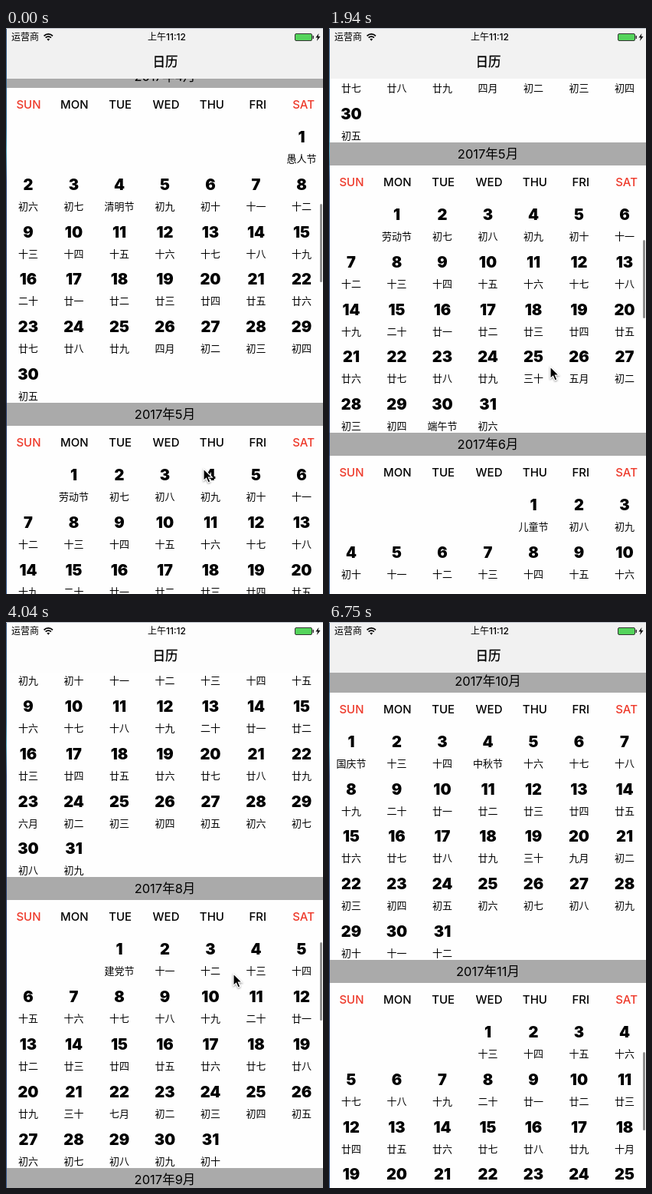
Write an HTML page that moves like this. It is 414 by 737 pixels and loops after 6810 ms.

```html
<!DOCTYPE html>
<html lang="zh-CN">
<head>
<meta charset="utf-8">
<title>日历</title>
<style>
  html, body { margin: 0; width: 100%; height: 100%; overflow: hidden; background: #fefefe; }
  body { position: relative; color: #000; font-family: Inter, "Noto Sans CJK SC", "Noto Sans CJK", sans-serif; }
  body * { position: absolute; }
  #list { left: 0; top: 0; width: 414px; }
  .bar { left: 0; width: 414px; height: 30px; background: #aaa; }
  .label { height: 20px; line-height: 20px; text-align: center; white-space: nowrap; }
  .month { font-size: 16.5px; }
  .week { font-size: 15px; font-weight: 500; }
  .red { color: #ee3a2b; }
  .day { font-size: 20px; font-weight: 900; }
  .lunar { font-size: 13px; font-family: "Noto Sans CJK SC", "Noto Sans CJK", sans-serif; }
  #nav { left: 0; top: 0; width: 414px; height: 66px; }
  .title { font-size: 16.5px; -webkit-text-stroke: .3px #000; }
  .status { font-size: 12px; }
  .clock { font-weight: 500; }
  #thumb { left: 410px; top: 0; width: 2.5px; height: 102px; border-radius: 2px; background: #8e8e8e; }
  #edge { left: 0; top: 0; width: 1px; height: 737px;
    background: linear-gradient(#35557f, #2f6f9c 130px, #4a9cba 160px, #27447a 200px, #1b2f5e 480px, #31558a); }
  #top { left: 0; top: 0; width: 414px; height: 1px; background: #b9bec6; }
  #tip { left: 371px; top: 722px; width: 60px; height: 30px; box-sizing: border-box;
    border: 1px solid #b5b5b5; border-radius: 5px; background: #ececec; }
  svg { left: 0; top: 0; overflow: visible; }
</style>
</head>
<body>
<div id="list"></div>
<div id="thumb"></div>
<div id="nav">
  <svg width="414" height="30">
    <g fill="none" stroke="#000" stroke-width="1.7">
      <path d="M49.6 10.3a8 8 0 0 1 11.4 0M51.7 12.7a5 5 0 0 1 7.2 0"/>
    </g>
    <path d="M53.4 14.6a2.7 2.7 0 0 1 3.8 0l-1.9 2.2z"/>
    <rect x="377.5" y="7.5" width="22" height="9" rx="1.5" fill="#55d45c" stroke="#333"/>
    <rect x="400.5" y="10" width="1.5" height="4" fill="#333"/>
    <path d="M408.5 7l-4 5.6h2.6l-1.2 4.4 4.6-6h-2.8z"/>
  </svg>
</div>
<div id="tip"></div>
<svg id="cursor" width="14" height="20">
  <path d="M0 0v15.5l3.6-3.3 2.5 5.8 2.8-1.2-2.5-5.6h5z" stroke="#fff" stroke-width="1.2"
    style="filter: drop-shadow(0 1px 1px #0006)"/>
</svg>
<div id="edge"></div>
<div id="top"></div>
<script>
const $ = id => document.getElementById(id);
const ROW = 61.8, HEAD = 69.2, LOOP = 6810;

function label(parent, cls, x, y, text, width = 100) {
  const el = document.createElement('div');
  el.className = 'label ' + cls;
  el.style.cssText = `left:${x - width / 2}px;top:${Math.round(y) - 10}px;width:${width}px`;
  el.textContent = text;
  parent.append(el);
}

// Lunar calendar of 2017: each month's first day and name
const lunarMonths = [
  [3, 28, '三'], [4, 26, '四'], [5, 26, '五'], [6, 24, '六'], [7, 23, '六'],
  [8, 22, '七'], [9, 20, '八'], [10, 20, '九'], [11, 18, '十']
];
const holidays = {
  '4-1': '愚人节', '4-4': '清明节', '5-1': '劳动节', '5-30': '端午节', '6-1': '儿童节',
  '7-1': '建军节', '8-1': '建党节', '9-10': '教师节', '10-1': '国庆节', '10-4': '中秋节'
};
const date = (m, d) => Date.UTC(2017, m - 1, d);

function lunar(m, d) {
  const [lm, ld, name] = lunarMonths.filter(s => date(s[0], s[1]) <= date(m, d)).pop();
  const n = Math.round((date(m, d) - date(lm, ld)) / 864e5) + 1;
  if (n === 1) return name + '月';
  if (n === 20) return '二十';
  if (n === 30) return '三十';
  return '初十廿'[Math.floor(n / 10) - (n === 10 ? 1 : 0)] + '十一二三四五六七八九'[n % 10];
}

const tops = [];
function buildMonth(m, top) {
  const list = $('list'), bar = document.createElement('div');
  bar.className = 'bar';
  bar.style.top = Math.round(top) + 'px';
  list.append(bar);
  label(bar, 'month', 207.5, 15, `2017年${m}月`);
  'SUN MON TUE WED THU FRI SAT'.split(' ').forEach((w, i) =>
    label(list, 'week' + (i % 6 ? '' : ' red'), 29.5 + 59.85 * i, top + 52, w));
  const first = new Date(date(m, 1)).getUTCDay();
  const days = new Date(date(m + 1, 0)).getUTCDate();
  for (let d = 1; d <= days; d++) {
    const cell = first + d - 1, x = 29 + 59.5 * (cell % 7);
    const y = top + 94 + ROW * Math.floor(cell / 7);
    label(list, 'day', x, y, d);
    label(list, 'lunar', x, y + 28, holidays[m + '-' + d] || lunar(m, d));
  }
  tops.push(top);
  return top + HEAD + ROW * Math.ceil((first + days) / 7);
}
for (let m = 4, top = 0; m <= 11; m++) top = buildMonth(m, top);

label($('nav'), 'title', 208, 44, '日历');
label($('nav'), 'status', 25, 12, '运营商');
label($('nav'), 'status clock', 210, 12, '上午11:12');
label($('tip'), 'lunar', 27, 13, '地图', 50);

// Piecewise linear value through [position, ...values]
function along(points, p, i = 1) {
  if (p <= points[0][0]) return points[0][i];
  const n = points.findIndex(q => q[0] > p);
  if (n < 0) return points.at(-1)[i];
  const a = points[n - 1], b = points[n];
  return a[i] + (b[i] - a[i]) * (p - a[0]) / (b[0] - a[0]);
}

// Each flick drags from grab to release, then coasts the distance left to its end
const START = -48, TAU = 500;
const flicks = [
  { grab: 100, release: 550, end: 307.5, dist: 274 },
  { grab: 2100, release: 2290, end: 1304.8, dist: 889.8 },
  { grab: 3960, release: 4090, end: 2335.8, dist: 961.1 }
];
const coast = (f, t) => f.end - f.dist * Math.exp((f.release - t) / TAU);

function scrollAt(t) {
  const n = flicks.findLastIndex(f => t >= f.grab);
  if (n < 0) return START;
  const f = flicks[n];
  if (t >= f.release) return coast(f, t);
  // The drag reaches the coasting speed at release
  const from = n ? coast(flicks[n - 1], f.grab) : START;
  const span = f.release - f.grab, move = f.end - f.dist - from;
  return from + move * ((t - f.grab) / span) ** (f.dist / TAU * span / move);
}

const cursorPath = [
  [0, 258, 574], [100, 260, 574], [550, 273, 493], [600, 273, 493], [1940, 289, 441],
  [2100, 289, 540], [2290, 292, 421], [3290, 292, 421], [3960, 296, 520], [4090, 298, 419],
  [4790, 379, 692], [5100, 420, 745]
];
const navShade = [[-55, 253], [0, 235], [20, 235], [48, 241], [150, 242], [220, 253]];

function stepTime(t) {
  const early = t >= 1900 && t < 6580 ? 10 : 0;
  return Math.floor((t + early) / 150) * 150 - early;
}

function draw(now) {
  const t = stepTime(now % LOOP), s = scrollAt(t);
  const move = (id, x, y) => $(id).style.transform = `translate(${Math.round(x)}px,${Math.round(y)}px)`;
  move('list', 0, -s);
  move('thumb', 0, 236 + 0.1391 * s);
  move('cursor', along(cursorPath, t), along(cursorPath, t, 2));
  const g = Math.round(Math.min(...tops.map(y => along(navShade, y - s))));
  $('nav').style.background = `rgb(${g},${g},${g})`;
  $('tip').style.display = t >= 5540 && t < 5990 ? '' : 'none';
}

const start = performance.now();
function tick() {
  draw(performance.now() - start);
  requestAnimationFrame(tick);
}
tick();
</script>
</body>
</html>
```
